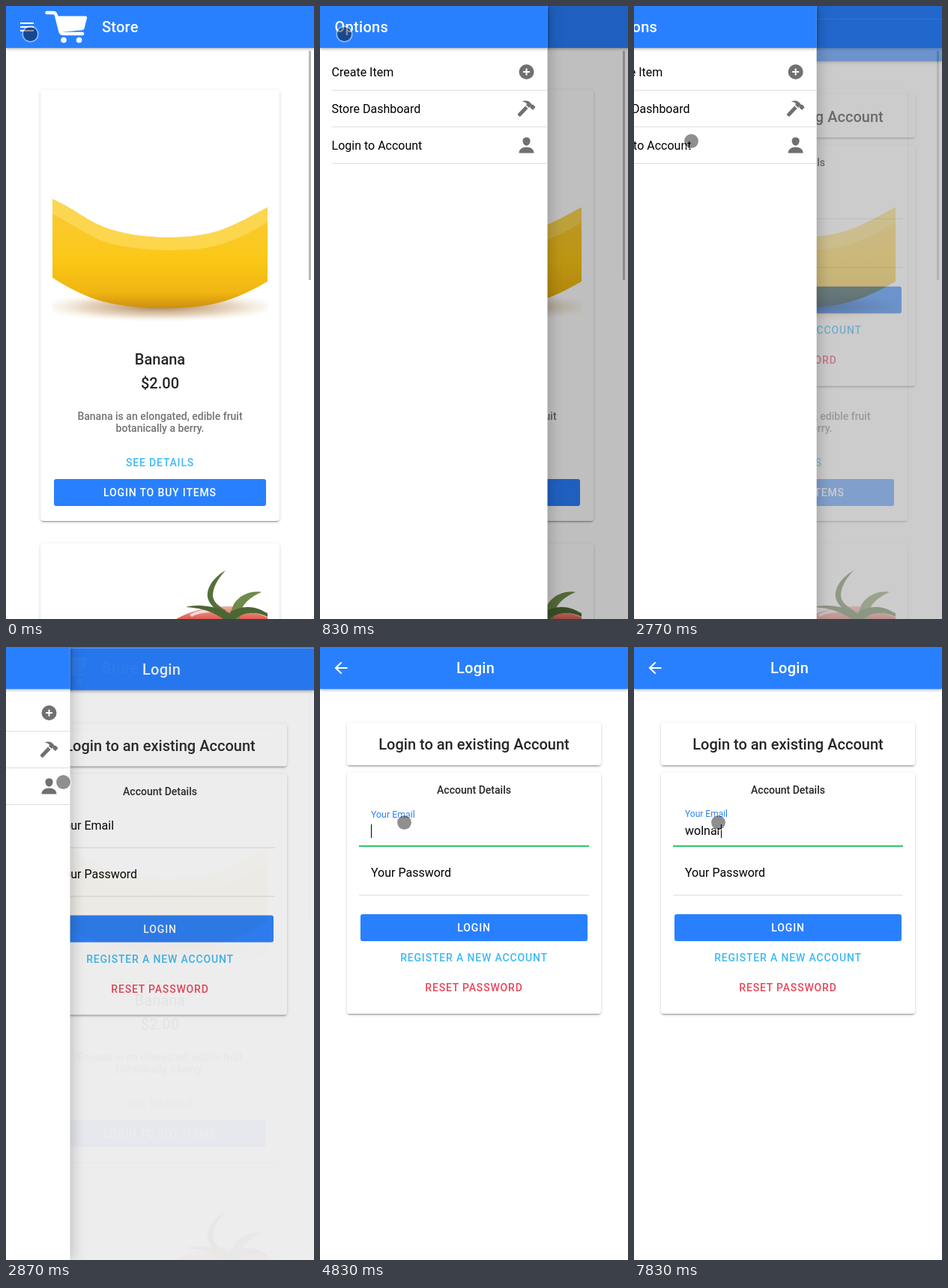
These frames come from a looping animation (411 px wide and 819 px high, 8 s). An HTML page:

```html
<!DOCTYPE html>
<html lang="en">
<head>
<meta charset="utf-8">
<title>Store login</title>
<style>
  html, body { margin: 0; width: 100%; height: 100%; overflow: hidden; background: #fff; }
  #stage { position: relative; width: 411px; height: 819px; overflow: hidden; }
  #stage div, svg { position: absolute; }
  svg { left: 0; top: 0; font-family: Roboto, sans-serif; font-size: 16px; }
  .page { left: 0; top: 0; width: 411px; height: 819px; background: #fff; overflow: hidden; }
  .bar { left: 0; top: 0; width: 100%; height: 56px; background: #2980ff; box-shadow: 0 1px 4px rgba(0,0,0,.38); }
  .card { border-radius: 4px; background: #fff;
    box-shadow: 0 3px 1px -2px rgba(0,0,0,.2), 0 2px 2px rgba(0,0,0,.14), 0 1px 5px rgba(0,0,0,.12); }
  #menu { left: 0; top: 0; width: 304px; height: 819px; background: #fff; box-shadow: 4px 0 16px rgba(0,0,0,.18); }
  #shade { left: 0; top: 0; width: 411px; height: 819px; background: #000; }
  .title { font-size: 20px; font-weight: 500; letter-spacing: .0125em; fill: #fff; }
  .mid { text-anchor: middle; }
  .head { font-size: 20px; font-weight: 500; fill: #262626; }
  .small { font-size: 14px; font-weight: 500; fill: #262626; }
  .note { font-size: 14px; font-weight: 500; fill: #737373; }
  .btn { font-size: 14px; font-weight: 500; letter-spacing: .06em; fill: #fff; }
  .link { fill: #3dbaf3; }
  .danger { fill: #e8475a; }
  .rule { fill: #dedede; }
  .blue { fill: #2980ff; }
</style>
</head>
<body>
<div id="stage">
  <div class="page">
    <div class="card" style="left:46px;top:112px;width:319px;height:576px"></div>
    <div class="card" style="left:46px;top:718px;width:319px;height:576px"></div>
    <div class="bar"></div>
    <svg width="411" height="819">
      <defs>
        <linearGradient id="peel" x1="0" y1="258" x2="0" y2="405" gradientUnits="userSpaceOnUse">
          <stop offset="0" stop-color="#f9c93a"/><stop offset=".55" stop-color="#fbc817"/>
          <stop offset=".85" stop-color="#f0b511"/><stop offset="1" stop-color="#c98d12"/>
        </linearGradient>
        <linearGradient id="skin" x1="0" y1="800" x2="0" y2="822" gradientUnits="userSpaceOnUse">
          <stop offset="0" stop-color="#efb9b0"/><stop offset="1" stop-color="#dc4d40"/>
        </linearGradient>
        <radialGradient id="ground">
          <stop offset="0" stop-color="#8a5a20" stop-opacity=".75"/>
          <stop offset=".6" stop-color="#b98a50" stop-opacity=".35"/>
          <stop offset="1" stop-color="#e8d0a8" stop-opacity="0"/>
        </radialGradient>
        <clipPath id="photo"><path d="M62 128H349V440H62zM62 734H349V819H62z"/></clipPath>
      </defs>
      <g clip-path="url(#photo)">
        <ellipse cx="205" cy="402" rx="165" ry="20" fill="url(#ground)"/>
        <path fill="url(#peel)" d="M62 258C90 270 105 285 130 295C175 313 245 313 285 300C310 291 330 279 349 269V368C325 382 298 396 260 401C215 406 165 404 130 395C105 388 82 376 62 363z"/>
        <path fill="#fddb5a" opacity=".75" d="M62 258C90 270 105 285 130 295C175 313 245 313 285 300C310 291 330 279 349 269V289C325 303 300 318 262 324C215 329 165 326 128 314C104 304 84 288 62 278z"/>
        <ellipse cx="297" cy="862" rx="100" ry="60" fill="url(#skin)"/>
        <path fill="#f6d9d4" d="M245 813Q262 804 280 805L272 810Q256 811 248 816zM322 806Q338 807 349 813V817Q335 810 320 810z"/>
        <path fill="#56703a" d="M293 754C279 762 267 776 269 790C271 800 280 806 288 813L294 808C284 802 276 796 276 787C277 774 284 764 293 754z"/>
        <path fill="#6f8a4a" d="M341 783C326 781 312 787 304 799L296 819H312C312 803 321 792 341 783z"/>
        <path fill="#4b6634" d="M240 803C258 799 277 801 300 812L304 819H290C277 810 260 804 240 803zM300 809C316 800 334 801 349 812V816C334 809 318 809 306 819H296z"/>
      </g>
      <g fill="#fff">
        <path d="M19 22h18v2h-18zM19 27h18v2h-18zM19 32h18v2h-18z"/>
        <path d="M66 13.5H106Q108.500 13.500 108 16L104.500 30Q104 32 102 32.300L72 35z"/>
        <path fill="none" stroke="#fff" stroke-width="4.500" stroke-linecap="round" d="M54.500 9H63Q66 9 67 12.500L72.500 34Q73.500 37 76.500 37H102"/>
        <circle cx="77" cy="45.500" r="3.800"/><circle cx="97.500" cy="45.500" r="3.800"/>
      </g>
      <text class="title" x="128" y="35">Store</text>
      <g class="mid">
        <text class="head" x="205.500" y="479">Banana</text>
        <text class="head" x="205.500" y="511">$2.00</text>
        <text class="note" x="205.500" y="553">Banana is an elongated, edible fruit</text>
        <text class="note" x="205.500" y="569">botanically a berry.</text>
        <text class="btn link" x="205.500" y="615">SEE DETAILS</text>
        <rect class="blue" x="64" y="632" width="283" height="36" rx="3"/>
        <text class="btn" x="205.500" y="655">LOGIN TO BUY ITEMS</text>
      </g>
      <rect x="404" y="60" width="3" height="306" fill="#b8b8b8"/>
    </svg>
  </div>

  <div class="page" id="login">
    <div class="card" style="left:36px;top:101px;width:339px;height:57px"></div>
    <div class="card" style="left:36px;top:168px;width:339px;height:322px"></div>
    <div class="bar"></div>
    <svg width="411" height="819">
      <path fill="#fff" d="M36.500 27H23.600l5.800-5.800L28 19.700 19.500 28l8.500 8.300 1.400-1.500L23.600 29H36.500z"/>
      <text class="title" x="182" y="35">Login</text>
      <g class="mid">
        <text class="head" x="205.500" y="137">Login to an existing Account</text>
        <text class="small" x="205.500" y="196">Account Details</text>
        <rect class="blue" x="54" y="357" width="303" height="36" rx="3"/>
        <text class="btn" x="205.500" y="380">LOGIN</text>
        <text class="btn link" x="205.500" y="420">REGISTER A NEW ACCOUNT</text>
        <text class="btn danger" x="205.500" y="460">RESET PASSWORD</text>
      </g>
      <text id="label">Your Email</text>
      <text x="68" y="307">Your Password</text>
      <rect class="rule" x="52" y="266" width="307" height="1"/>
      <rect class="rule" x="52" y="331" width="307" height="1"/>
      <rect id="focus" x="52" y="265" width="307" height="2" fill="#2fc76b"/>
      <text id="typed" x="68" y="251"></text>
      <rect id="caret" y="237" width="1" height="18"/>
    </svg>
  </div>

  <div id="shade"></div>

  <div id="menu">
    <div class="bar"></div>
    <svg width="304" height="819">
      <text class="title" x="20" y="35">Options</text>
      <text x="16" y="94">Create Item</text>
      <text x="16" y="143">Store Dashboard</text>
      <text x="16" y="192">Login to Account</text>
      <path class="rule" d="M16 112h288v1H16zM16 161h288v1H16zM16 210h288v1H16z"/>
      <g fill="#707070">
        <circle cx="276" cy="88" r="10"/>
        <path fill="#fff" d="M275 83.500h2V87h3.500v2H277v3.500h-2V89h-3.500v-2h3.500z"/>
        <path d="M264.500 144L274.500 133.500L278 137L268 147.500Q266.500 148 265 146.500Q264 145 264.500 144zM270 127.500Q277 125 281 129L283.500 132L285 131.800L288 135.200L284.500 139L281 136L281 134L279.500 136L275.500 132.500L276.500 130.500Q274 128 270 127.500z"/>
        <path d="M276 175.500c3.500 0 5.200 2.200 5 5.200-.3 3.300-2.500 5.800-5 5.800s-4.700-2.500-5-5.800c-.2-3 1.500-5.200 5-5.200zM266 196.500c0-5 4-8 10-8s10 3 10 8z"/>
      </g>
    </svg>
  </div>

  <svg width="411" height="819">
    <g id="cursor">
      <circle r="9.500" fill="#000" fill-opacity=".44"/>
      <circle r="10.300" fill="none" stroke="#fff" stroke-opacity=".45" stroke-width="1.600"/>
    </g>
  </svg>
</div>
<script>
const LOOP = 8000;
const el = id => document.getElementById(id);
const [login, shade, menu, label, focusLine, typed, caret, cursor] =
  ['login', 'shade', 'menu', 'label', 'focus', 'typed', 'caret', 'cursor'].map(el);
const show = (node, on) => { node.style.visibility = on ? 'visible' : 'hidden'; };
const mix = (a, b, k) => a + (b - a) * k;
const span = (t, start, length) => Math.min(1, Math.max(0, (t - start) / length));

// CSS-style cubic bezier, solved by bisection
function bezier(x1, y1, x2, y2) {
  const at = (a, b, s) => 3 * a * s * (1 - s) ** 2 + 3 * b * s * s * (1 - s) + s ** 3;
  return x => {
    if (x <= 0 || x >= 1) return x;
    let lo = 0, hi = 1;
    for (let i = 0; i < 24; i++) {
      const m = (lo + hi) / 2;
      if (at(x1, x2, m) < x) lo = m; else hi = m;
    }
    return at(y1, y2, lo);
  };
}
const easeOpen = bezier(0, 0, .2, 1);
const easeClose = bezier(.4, 0, .6, 1);
const easePage = bezier(.36, .66, .04, 1);
const easeLabel = bezier(.4, 0, .2, 1);

const NAME = 'wolnar';
const KEYS = [5730, 5970, 6200, 6430, 6600, 6870];
const FOCUS = 4715;
const STOPS = [[1770, 76.5, 180.5], [3700, 85.5, 190.5], [3800, 91, 201], [3930, 97.5, 213.5], [4100, 112.5, 234.5]];

function pointer(t) {
  const stop = STOPS.filter(s => s[0] <= t).pop();
  if (stop) return stop.slice(1);
  const k = span(t, 1400, 230);
  return [mix(32.5, 54.5, k), mix(37.5, 125.5, k)];
}

function draw(t) {
  const open = easeOpen(span(t, 547, 300)) * (1 - easeClose(span(t, 2680, 300)));
  menu.style.transform = `translateX(${304 * (open - 1)}px)`;
  show(menu, open > 0);
  shade.style.opacity = .25 * open;

  const page = easePage(span(t, 2713, 280));
  login.style.opacity = page;
  login.style.transform = `translateY(${40 * (1 - page)}px)`;

  const focused = t >= FOCUS;
  const lift = easeLabel(span(t, FOCUS, 180));
  label.setAttribute('transform', `translate(68 ${mix(242, 227, lift)}) scale(${mix(1, .75, lift)})`);
  label.setAttribute('fill', focused ? '#2980ff' : '#000');
  focusLine.style.opacity = focused ? 1 : 0;

  const count = KEYS.filter(k => k <= t).length;
  typed.textContent = NAME.slice(0, count);
  caret.setAttribute('x', Math.round(68 + (count ? typed.getComputedTextLength() : 0)));
  const off = (t >= 5230 && t < 5730) || (t >= 7330 && t < 7830);
  caret.style.opacity = focused && !off ? 1 : 0;

  cursor.setAttribute('transform', `translate(${pointer(t)})`);
}

const begin = performance.now();
function tick() {
  draw((performance.now() - begin) % LOOP);
  requestAnimationFrame(tick);
}
tick();
</script>
</body>
</html>
```
